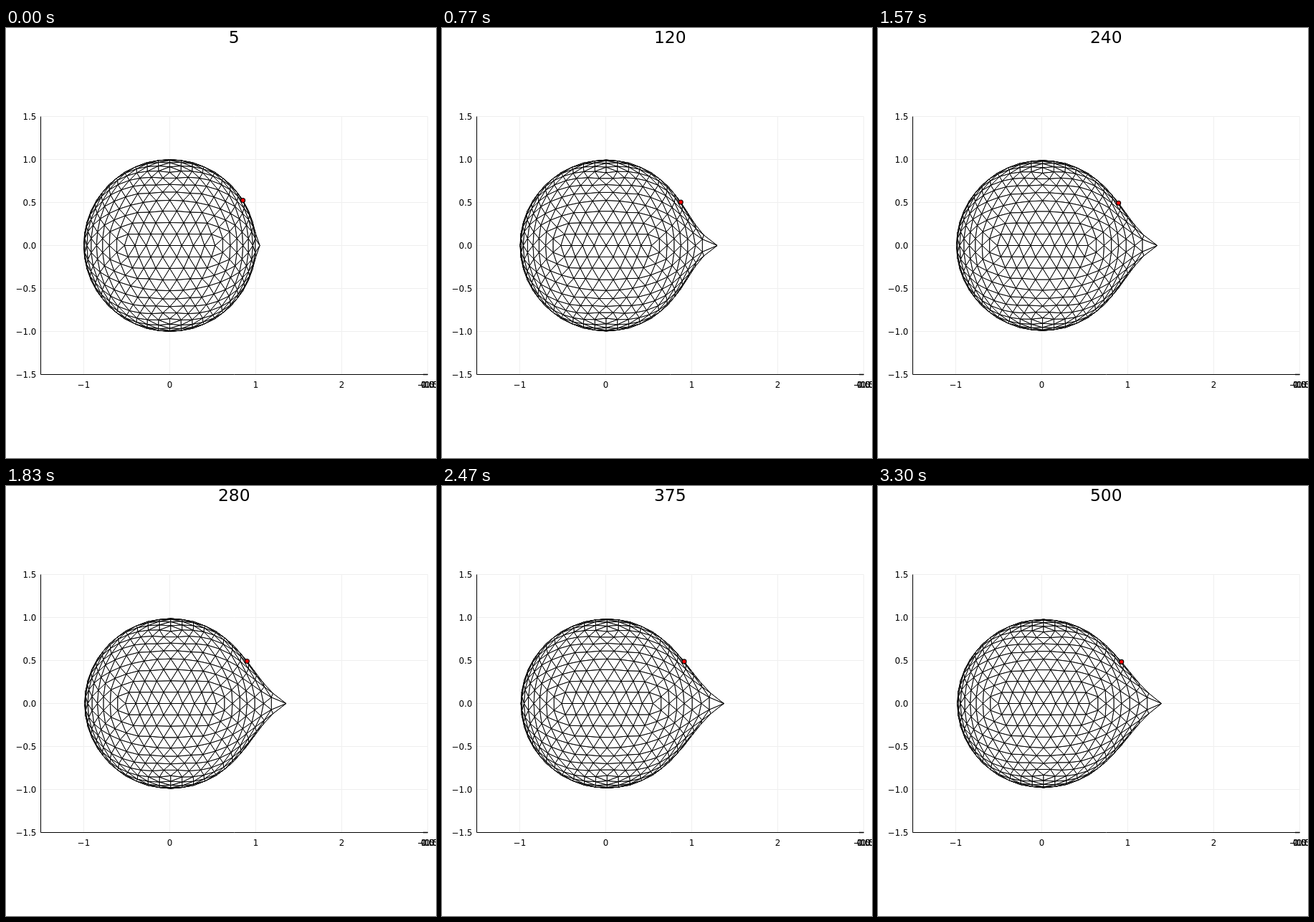
Animation of 600 by 600 pixels, one loop 3.33 s. Source, as an HTML page with a canvas:

```html
<!DOCTYPE html>
<html lang="en">
<head>
<meta charset="utf-8">
<title>Pulled sphere mesh</title>
<style>
  html, body { margin: 0; width: 100%; height: 100%; overflow: hidden; background: #fff; }
  canvas { display: block; width: 600px; height: 600px; }
</style>
</head>
<body>
<canvas id="stage" width="600" height="600"></canvas>
<script>
const ctx = document.getElementById('stage').getContext('2d');
const LOOP = 3330, STEPS = 100, SCALE = 120;
const FONT = '"DejaVu Sans", sans-serif';
const px = x => 228.5 + SCALE * x;
const py = y => 303.5 - SCALE * y;

const normalize = v => { const r = Math.hypot(...v); return v.map(c => c / r); };
const middle = (a, b) => normalize(a.map((c, i) => c + b[i]));
const dot = (a, b) => a[0] * b[0] + a[1] * b[1] + a[2] * b[2];

// Icosahedron with an edge midpoint on the +x axis, split three times.
function icosphere(levels) {
  const phi = (1 + Math.sqrt(5)) / 2, corners = [];
  for (const s of [-1, 1]) for (const t of [-1, 1]) {
    corners.push([s, 0, t * phi], [0, s * phi, t], [s * phi, t, 0]);
  }
  const verts = corners.map(normalize);
  const near = (a, b) => dot(a, b) > 0.4;
  let faces = [];
  verts.forEach((a, i) => verts.forEach((b, j) => verts.forEach((c, k) => {
    if (i < j && j < k && near(a, b) && near(b, c) && near(a, c)) faces.push([a, b, c]);
  })));
  for (let n = 0; n < levels; n++) {
    faces = faces.flatMap(([a, b, c]) => {
      const ab = middle(a, b), bc = middle(b, c), ca = middle(c, a);
      return [[a, ab, ca], [ab, b, bc], [ca, bc, c], [ab, bc, ca]];
    });
  }
  const depth = f => f[0][2] + f[1][2] + f[2][2];
  return faces.sort((f, g) => depth(f) - depth(g));
}

const faces = icosphere(3);
const marker = normalize([(1 + Math.sqrt(5)) / 2, 1, 0]);

// Displacement of the membrane after n iterations, symmetric about the x axis.
function deformation(n) {
  const t = n / 500;
  const drift = 0.019 * t;
  const pull = 0.0675 * Math.log(1 + n / 1.52) * (1 - Math.exp(-n / 7.95));
  const width = 17 * Math.pow(t, 0.29);
  const neck = 0.032 * (1 - Math.exp(-n / 75));
  const neckAngle = 25 * Math.pow(t, 0.15);
  return ([x, y, z]) => {
    const angle = Math.acos(Math.max(-1, Math.min(1, x))) * 180 / Math.PI;
    const radius = Math.hypot(y, z);
    const q = angle / neckAngle;
    const inward = 0.022 * t * radius + neck * q * Math.exp(0.5 - q * q / 2);
    const shrink = radius > 1e-6 ? 1 - inward / radius : 1;
    return [px(x + drift + (pull - drift) * Math.exp(-angle / width)), py(y * shrink)];
  };
}

function line(x1, y1, x2, y2, color, width = 1) {
  ctx.strokeStyle = color;
  ctx.lineWidth = width;
  ctx.beginPath();
  ctx.moveTo(x1, y1);
  ctx.lineTo(x2, y2);
  ctx.stroke();
}

function label(text, x, y, size, align) {
  ctx.font = `${size}px ${FONT}`;
  ctx.textAlign = align;
  ctx.fillStyle = '#000';
  ctx.fillText(text, x, y);
}

const tick = (v, digits) => v.toFixed(digits).replace('-', '\u2212');

function drawAxes() {
  const left = 48.5, right = 588.5, top = 123.5, bottom = 483.5;
  for (let x = -1; x <= 3; x++) line(px(x), top, px(x), bottom, '#efefef');
  for (let y = -1.5; y <= 1.5; y += 0.5) line(left, py(y), right, py(y), '#efefef');
  line(left, top, left, bottom, '#000');
  line(left, bottom, right, bottom, '#000');
  line(582, bottom, right, bottom, '#000', 1.5);
  for (let x = -1; x <= 2; x++) label(tick(x, 0), px(x), 501.5, 11.8, 'center');
  for (let v = -1.5; v <= 1.5; v += 0.5) {
    label(tick(v, 1), 42.3, py(v) + 4.4, 11.8, 'right');
    if (Math.abs(v) < 1.5) label(tick(v, 1), right, 501.5, 11.8, 'center');
  }
}

function drawMesh(place) {
  ctx.fillStyle = '#fff';
  ctx.strokeStyle = '#000';
  ctx.lineWidth = 1;
  ctx.lineJoin = 'round';
  for (const face of faces) {
    ctx.beginPath();
    for (const v of face) ctx.lineTo(...place(v));
    ctx.closePath();
    ctx.fill();
    ctx.stroke();
  }
}

function drawMarker([x, y]) {
  ctx.beginPath();
  ctx.arc(x, y, 3, 0, 2 * Math.PI);
  ctx.fillStyle = '#f00';
  ctx.strokeStyle = '#000';
  ctx.lineWidth = 1.1;
  ctx.fill();
  ctx.stroke();
}

function draw(step) {
  const n = 5 * (step + 1);
  const place = deformation(n);
  ctx.fillStyle = '#fff';
  ctx.fillRect(0, 0, 600, 600);
  drawAxes();
  drawMesh(place);
  drawMarker(place(marker));
  label(String(n), 318.3, 21, 23.4, 'center');
}

let shown = -1;
const start = performance.now();

function tickFrame() {
  const time = (performance.now() - start) % LOOP;
  // Steps last a thirtieth of a second, rounded to 10 ms.
  const step = Math.min(STEPS - 1, Math.floor((10 * Math.floor(time / 10) + 3.4) * 0.03));
  if (step !== shown) draw(shown = step);
  requestAnimationFrame(tickFrame);
}
tickFrame();
</script>
</body>
</html>
```
